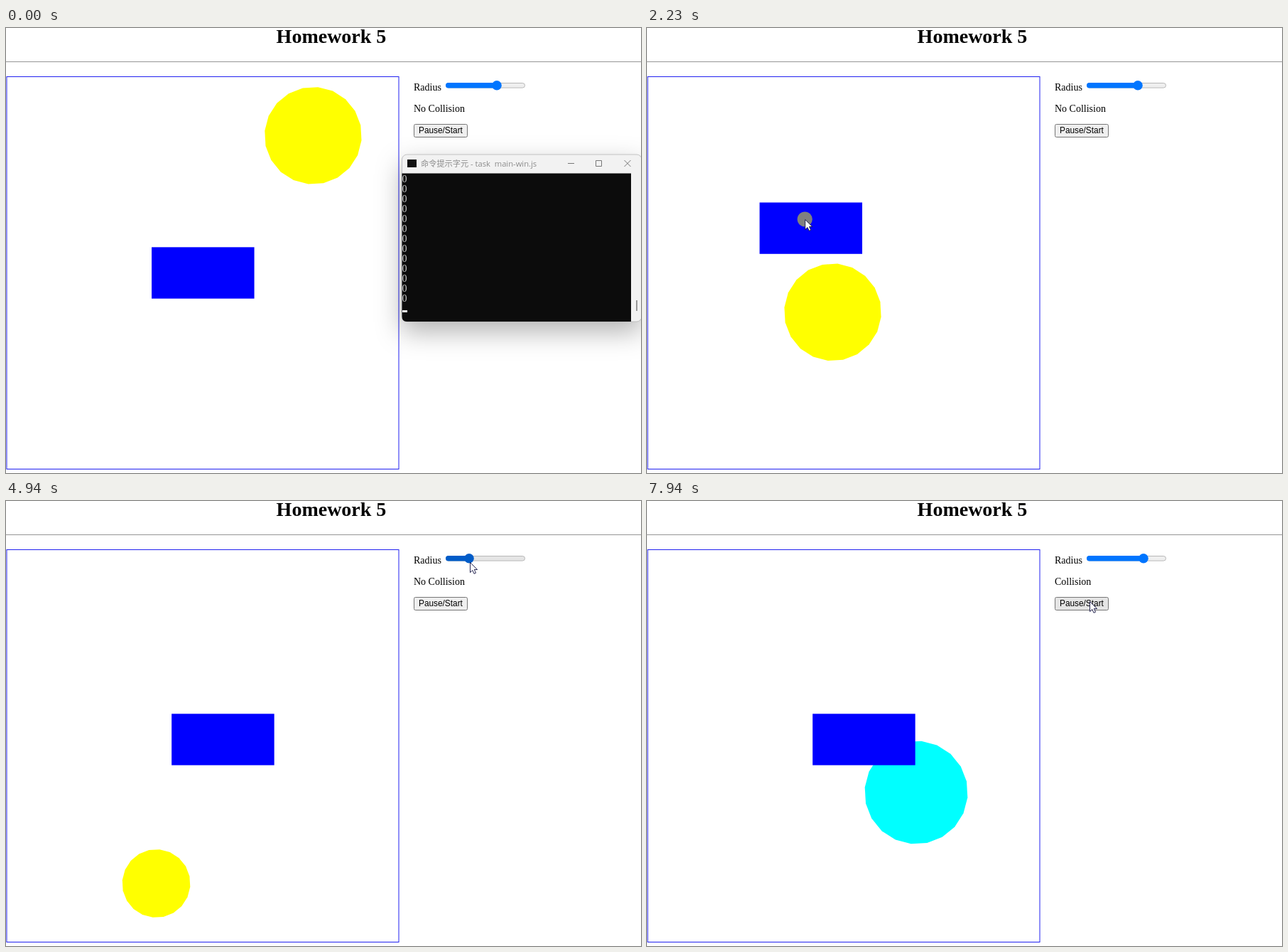
An HTML page for the animation above (8 s loop, 894 px wide and 626 px high).

```html
<!DOCTYPE html>
<html lang="en">
<head>
<meta charset="utf-8">
<title>Collision demo</title>
<style>
  html, body { margin: 0; width: 100%; height: 100%; overflow: hidden; background: #fff; }
  svg { display: block; }
  text { white-space: pre; }
  .serif { font-family: "Liberation Serif", "Times New Roman", serif; }
  .sans { font-family: "Liberation Sans", Arial, sans-serif; }
  .ui { font-family: "Open Sans", "Noto Sans CJK TC", "Noto Sans CJK", sans-serif; }
  #console { filter: drop-shadow(0 14px 18px rgba(0, 0, 0, .3)); }
</style>
</head>
<body>
<svg width="894" height="626" viewBox="0 0 894 626">
  <text class="serif" x="458" y="21" font-size="28" font-weight="bold" text-anchor="middle">Homework 5</text>
  <path d="M0 47.5H894" stroke="#969696"/>
  <rect x="1" y="68.5" width="552" height="552" fill="none" stroke="#2020f0"/>
  <polygon id="disc"/>
  <rect id="box" width="144.5" height="72.3" fill="#00f"/>

  <g class="serif" font-size="14">
    <text x="574" y="88">Radius</text>
    <text id="label" x="574" y="118"></text>
  </g>
  <rect id="track" x="619.5" y="77.5" width="111" height="6.6" rx="3.3" stroke="#b2b2b2" stroke-width=".9"/>
  <rect id="fill" x="619" y="77" width="0" height="7.4" rx="3.7"/>
  <circle id="thumb" cy="80.8" r="6.8"/>
  <rect id="button" x="574.5" y="135.5" width="75" height="18" rx="2" stroke="#767676"/>
  <text class="sans" x="581" y="148.2" font-size="11.85">Pause/Start</text>

  <g id="console">
    <rect x="557.5" y="178" width="337.5" height="235" rx="7" fill="#f2f2f2" stroke="#b5b5b5" stroke-width=".8"/>
    <path d="M557.5 204.5H880V413H564Q557.5 413 557.5 406Z" fill="#0c0c0c"/>
    <rect x="565" y="185" width="13" height="11" fill="#111"/>
    <text class="ui" x="584" y="195" font-size="11.2" fill="#8c8c8c">命令提示字元 - task  main-win.js</text>
    <path d="M791 190.5H800M830.5 186.5H838.5V194.5H830.5ZM870.5 186L879.5 195M879.5 186L870.5 195" fill="none" stroke="#777"/>
    <path d="M888 383V398" stroke="#808080" stroke-width="1.6"/>
    <g id="zeros" class="serif" font-size="14" fill="#ccc"></g>
    <rect x="558" y="397" width="7" height="3" fill="#f2f2f2"/>
  </g>

  <g id="pointer">
    <circle id="halo" r="10.6" fill="#ff0" fill-opacity=".5"/>
    <path d="M.5 .5V14.6L3.8 11.5L6 16.3L8.5 15.2L6.3 10.5H10.6Z" fill="#fff" stroke="#101040" stroke-width=".9"/>
  </g>
</svg>
<script>
const $ = id => document.getElementById(id);
const LOOP = 8000, STEP = LOOP / 115;
const W = 144.5, H = 72.3;

// Keys are [time, value, ...]; values between keys are linear.
const discX = [[0, 432.4], [425, 484], [1461, 356.5], [2991, 166.5], [3617, 89], [3770, 71],
  [4939, 211.5], [6122, 360], [7108, 481], [7930, 379]];
const discY = [[0, 151.3], [1461, 517], [1605, 551], [2991, 213.5], [3312, 141], [3617, 210],
  [4939, 538], [5078, 572], [6122, 317], [6837, 141], [7930, 410]];
const mouse = [[350, 300, 640], [800, 277.3, 344.5], [980, 277.3, 344.5], [1200, 235, 290], [1391, 215.3, 363.2],
  [1461, 251, 418], [1650, 275, 390], [2000, 250, 310], [2480, 191, 223], [2700, 252, 168],
  [2922, 219, 247.3], [2991, 196, 270], [3250, 250, 310], [3548, 305.5, 341], [3617, 305.4, 335.5],
  [3690, 305.4, 335.5], [4130, 691, 82], [4300, 691, 81], [4700, 653, 82], [4939, 653, 86],
  [5650, 653, 84], [5800, 655, 77], [5950, 657, 76], [6122, 688, 76], [6330, 701, 75],
  [6800, 701, 79], [7480, 636, 156], [7650, 627, 145], [7930, 623, 141]];
const slide = [[4300, 691], [4700, 652], [5960, 652], [6122, 678], [6330, 699]];
const presses = [[790, 3590], [4230, 4800], [5780, 6600]];

function at(keys, t) {
  const i = keys.findIndex(k => k[0] > t);
  if (i === 0) return keys[0].slice(1);
  if (i < 0) return keys[keys.length - 1].slice(1);
  const a = keys[i - 1], b = keys[i], u = (t - a[0]) / (b[0] - a[0]);
  return a.slice(1).map((v, n) => v + (b[n + 1] - v) * u);
}

function set(id, attrs) {
  for (const name in attrs) $(id).setAttribute(name, attrs[name]);
}

function polygon(cx, cy, r) {
  return Array.from({ length: 20 }, (_, i) => {
    const a = .1 + i * Math.PI / 10;
    return (cx + r * Math.cos(a)).toFixed(1) + ',' + (cy + r * Math.sin(a)).toFixed(1);
  }).join(' ');
}

function draw(t) {
  const [x] = at(discX, t), [y] = at(discY, t);
  const [mx, my] = at(mouse, t);
  const [knob] = at(slide, t);
  const r = 48 + (at(slide, t - 150)[0] - 652) * .525;

  // The box trails the dragging pointer by one step and stays where it is dropped.
  const [bx, by] = t < 980 ? [277.3, 344.5] : at(mouse, Math.min(t - STEP, 3690));
  const dx = Math.max(0, Math.abs(x - bx) - W / 2);
  const dy = Math.max(0, Math.abs(y - by) - H / 2);
  const hit = Math.hypot(dx, dy) < r;

  set('disc', { points: polygon(x, y, r), fill: hit ? '#0ff' : '#ff0' });
  set('box', { x: bx - W / 2, y: by - H / 2 });
  $('label').textContent = hit ? 'Collision' : 'No Collision';

  const pressed = presses.some(([a, b]) => t >= a && t < b);
  const onSlider = mx > 618 && mx < 732 && my > 72 && my < 89;
  const onButton = mx > 574 && mx < 650 && my > 135 && my < 154;
  const [blue, grey] = !onSlider ? ['#0075ff', '#efefef']
    : pressed ? ['#3793ff', '#f5f5f5'] : ['#005cc8', '#e5e5e5'];
  set('track', { fill: grey });
  set('fill', { width: knob - 619, fill: blue });
  set('thumb', { cx: knob, fill: blue });
  set('button', { fill: onButton ? '#e5e5e5' : '#efefef' });

  set('console', { visibility: t < 2 * STEP ? 'visible' : 'hidden' });
  set('pointer', { transform: `translate(${mx} ${my})` });
  set('halo', { visibility: pressed ? 'visible' : 'hidden' });
}

$('zeros').innerHTML = Array.from({ length: 13 },
  (_, i) => `<text x="557.5" y="${216.5 + 14 * i}">0</text>`).join('');

const start = performance.now();
function tick() {
  const t = (performance.now() - start) % LOOP;
  draw(Math.floor((t + 6) / STEP) % 115 * STEP);
  requestAnimationFrame(tick);
}
tick();
</script>
</body>
</html>
```
